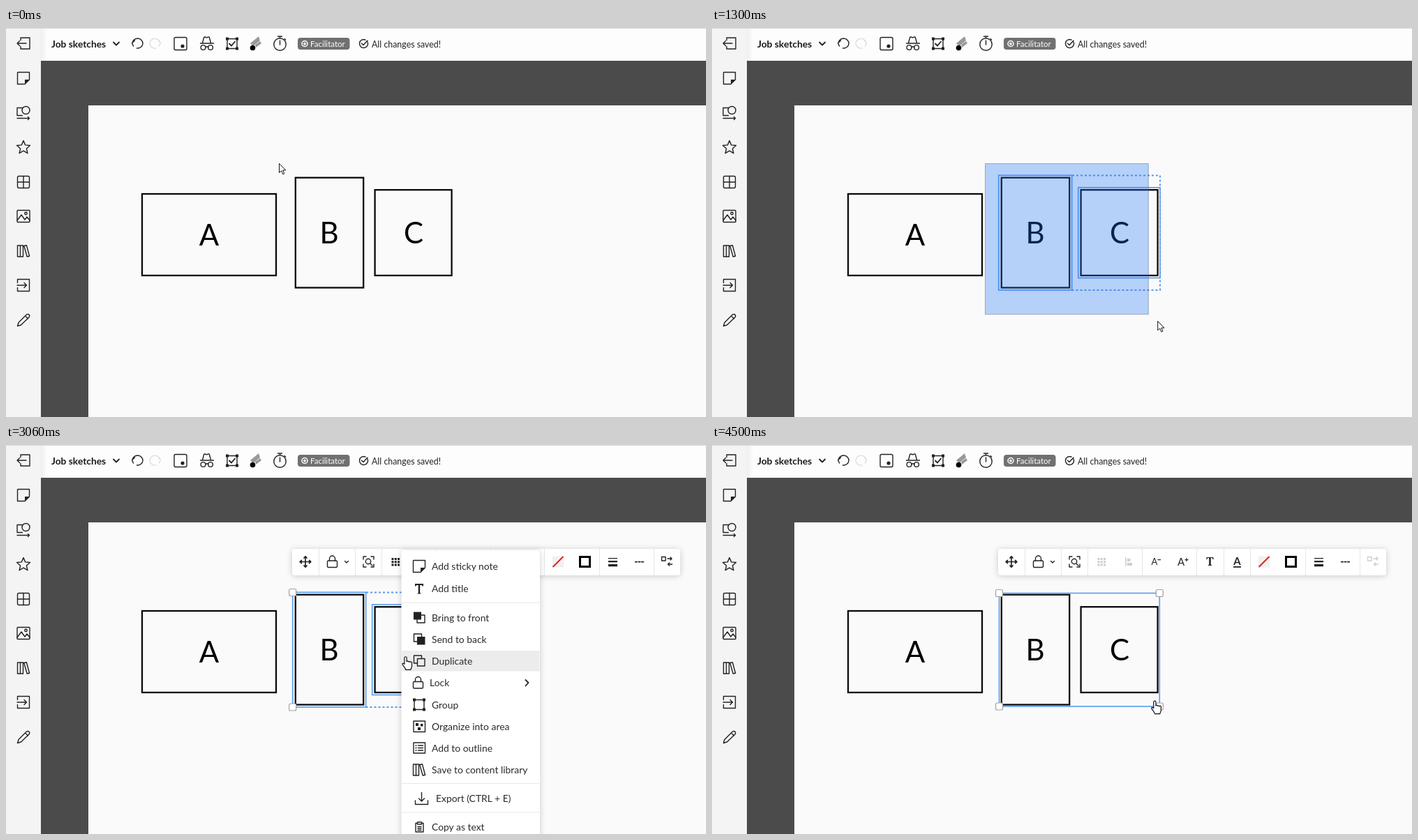
An HTML page for the animation above (5500 ms loop, 1003 by 558 pixels).

```html
<!DOCTYPE html>
<html lang="en">
<head>
<meta charset="utf-8">
<title>Grouping shapes</title>
<style>
html, body { margin: 0; width: 100%; height: 100%; overflow: hidden; background: #fafafa; }
svg { display: block; width: 1003px; height: 558px; font-family: Lato, "Open Sans", sans-serif; }
.i { fill: none; stroke: #222; stroke-width: 1.4; stroke-linejoin: round; stroke-linecap: round; }
.k { fill: #222; stroke: none; }
.box { fill: none; stroke: #0a0a0a; stroke-width: 2.3; }
.big { font-size: 42px; text-anchor: middle; }
.sel { fill: none; stroke: #589cef; stroke-width: 1.6; }
.grip rect { fill: #fff; stroke: #a0a0a0; stroke-width: 1.2; }
.panel { fill: #fff; filter: drop-shadow(0 1px 4px rgba(0,0,0,.2)); }
.rule { stroke: #e6e6e6; }
#menu text { font-size: 13.9px; fill: #2b2b2b; }
</style>
</head>
<body>
<svg viewBox="0 0 1003 558">
  <defs>
    <linearGradient id="edge"><stop stop-color="#eee"/><stop offset="1" stop-color="#fdfdfd"/></linearGradient>
    <g id="note"><path d="M-8-8.500H8.500V2L2 8.500H-8.500V-8z"/><path class="k" d="M2 8.500V2H8.500z"/></g>
    <g id="books"><path d="M-8.500-8h4V8h-4zM-4.500-8h4V8h-4zM.8-7.500l3.600-.8L8.600 7.200l-3.400.8z"/></g>
    <g id="frame"><path d="M-7-7H7V7H-7z"/><path class="k" d="M-9-9h4v4h-4zM5-9h4v4H5zM-9 5h4v4h-4zM5 5h4v4H5z"/></g>
    <g id="lock"><rect x="-7" y="-1.500" width="14" height="9.500" rx="1.500"/><path d="M-4-1.500v-3a4 4 0 0 1 8 0v3"/></g>
  </defs>

  <path d="M50 47H1003V111H118V558H50z" fill="#4b4b4b"/>
  <path d="M118 111H1003V558H118z" fill="#fafafa"/>
  <path d="M0 0H1003V47H0z" fill="#fdfdfd"/>
  <path d="M50 0h9v47h-9z" fill="url(#edge)"/>
  <path d="M0 0H50V558H0z" fill="#f4f4f4"/>
  <path d="M0 .5H1003" stroke="#d8d8d8"/>

  <g class="i">
    <g transform="translate(25 22)"><path d="M-4-4.500V-8H9V8H-4V4.500M4 0H-9M-5.500-3.500L-9 0l3.500 3.500"/></g>
    <use href="#note" x="25" y="72"/>
    <g transform="translate(25 121)"><path d="M-1.500 4.500H-9V-6.500H-1.500M-9 8.500H8.500M6.500 6.500l2 2-2 2"/><circle cx="3.500" cy="-3" r="5.500"/></g>
    <path id="star" transform="translate(25 171)"/>
    <g transform="translate(25 221)"><rect x="-8.500" y="-8.500" width="17" height="17" rx="2"/><path d="M0-8.500V8.500M-8.500 0H8.500"/></g>
    <g transform="translate(25 270)"><rect x="-9" y="-8.500" width="18" height="17" rx="1"/><path d="M-9 6l6-8 5 7 3-4 4 5"/><circle cx="3.500" cy="-4" r="1.700"/></g>
    <use href="#books" x="25" y="320"/>
    <g transform="translate(25 369)"><path d="M-8.500-3.500V-8.500H8.500V8.500H-8.500V3.500M-9 0H4M1-3.500L4.500 0 1 3.500"/></g>
    <path transform="translate(25 419)" d="M-8.500 8.500l1.500-5L4.500-8q2-1.200 3.500.3T8-4L-3.500 7zM2.500-6l4 4"/>
  </g>

  <text x="65" y="28" font-size="13.800" font-weight="700" fill="#1a1a1a">Job sketches</text>
  <g class="i">
    <path d="M154 20.500l4 4 4-4" stroke-width="1.800"/>
    <path id="undo" d="M184.500 18l-4 3.500 2 4.500M181 22a7.500 7 0 1 1 6.500 7"/>
    <path d="M218.500 18l3 3.500-2 4.500M221 22a7.500 7 0 1 0-6 7" stroke="#ddd"/>
    <rect x="241" y="13.500" width="18" height="18" rx="2"/><circle class="k" cx="253" cy="26" r="2.600"/>
    <path d="M278.500 22H297.500M281.500 21.500l2-7.500q.3-1.500 2-1l2 .8 2-.8q1.700-.5 2 1l2 7.500M286 27.500q2-1.500 4 0"/>
    <circle cx="282.500" cy="28" r="3.400"/><circle cx="293" cy="28" r="3.400"/>
    <use href="#frame" x="324" y="22.500"/><path d="M320 22.500l3 3 5-6" stroke-width="1.800"/>
    <path d="M350 22L362 12l2 6-10 8zM357 24l7-5 2 3-8 6z" fill="#999" stroke="none"/>
    <circle class="k" cx="353.500" cy="28.500" r="3.800" style="fill:#000"/>
    <circle cx="392.500" cy="23.500" r="8.700"/><path d="M392.500 24V18M389.500 12H395.500M392.500 12v2.500M399 15.500l1.700 1.500"/>
  </g>
  <rect x="418" y="14" width="74.500" height="17" rx="4" fill="#707070"/>
  <circle cx="428" cy="22.500" r="4" fill="none" stroke="#fff" stroke-width="1.500"/>
  <path d="M428 20l.8 1.600 1.800.2-1.300 1.300.3 1.800-1.600-.9-1.600.9.300-1.800-1.300-1.300 1.800-.2z" fill="#fff"/>
  <text x="436" y="26.500" font-size="11.500" fill="#fff">Facilitator</text>
  <path class="i" d="M518 20a6 6 0 1 1-3-3M509.500 22l2.500 2.500 6-6.500"/>
  <text x="524" y="28" font-size="12.400" fill="#222">All changes saved!</text>

  <rect class="box" x="195" y="238" width="192" height="117"/>
  <rect class="box" x="414.800" y="214.700" width="97.400" height="157.800"/>
  <rect class="box" x="528.600" y="232.200" width="110" height="122.800"/>
  <text class="big" x="291" y="312">A</text>
  <text class="big" x="463" y="309">B</text>
  <text class="big" x="584" y="309">C</text>

  <rect id="selB" class="sel" x="410.700" y="211.300" width="105" height="164.700"/>
  <g id="selC" class="sel">
    <rect x="524.700" y="228.800" width="117.300" height="129.700"/>
    <path d="M516 211.500H642V376H516" stroke-dasharray="3 3" stroke-width="2"/>
  </g>
  <rect id="group" class="sel" x="411.500" y="212.500" width="229.800" height="162.500"/>
  <g id="gripsLoose" class="grip"></g>
  <g id="gripsGroup" class="grip"></g>
  <rect id="marquee" x="391.500" y="194.500" fill="rgba(26,115,245,.31)" stroke="rgba(90,110,140,.5)"/>

  <g id="bar">
    <rect class="panel" x="410" y="149" width="556" height="38" rx="4"/>
    <path id="dividers" class="rule"/>
    <g class="i">
      <path d="M421.500 167.500H436.500M429 160V175M427 162l2-2.300 2 2.300M427 173l2 2.300 2-2.300M423.500 165.500l-2.300 2 2.300 2M434.500 165.500l2.300 2-2.300 2" stroke-width="1.700"/>
      <use href="#lock" x="467.500" y="167.500"/>
      <path d="M485.500 166.500l2.500 2.500 2.500-2.500"/>
      <path d="M512 164v-4h4M523 160h4v4M512 171v4h4M523 175h4v-4"/><circle cx="519" cy="167" r="3.700"/><path d="M522 170l3 3"/>
    </g>
    <g class="k">
      <g class="multi"><path id="dots"/></g>
      <path class="multi" d="M592 161h1.600v13H592zM595 163h4.500v4H595zM595 169h7v4H595z"/>
      <text x="629.500" y="172" font-size="13">A</text><path d="M638.500 164h4.500v1.200h-4.500z"/>
      <text x="667" y="173" font-size="15">A</text><path d="M677.500 164h5v1.200h-5zM679.400 162.100h1.200v5h-1.200z"/>
      <text x="713.500" y="173" font-size="16" font-weight="700" text-anchor="middle" font-family="Noto Serif, Liberation Serif, serif">T</text>
      <text x="752.500" y="172" font-size="15" font-weight="700" text-anchor="middle">A</text><path d="M747 174h11v1.800h-11z"/>
    </g>
    <path d="M783 159.500h16v16h-16z" fill="#f1f1f1"/><path d="M783.500 175L798.500 160" stroke="#e02020" stroke-width="2"/>
    <rect x="822.500" y="160.500" width="14" height="14" fill="none" stroke="#000" stroke-width="3"/>
    <path class="k" d="M863 162h13v1.300h-13zM863 166h13v2.300h-13zM863 171h13v3.300h-13zM901 166.700h3.800v1.700H901zM905.600 166.700h3.800v1.700h-3.800zM910.200 166.700h3.800v1.700h-3.800z"/>
    <g class="i multi"><path d="M939.500 160.500h5.500v5.500h-5.500zM948 163h6M952 161l2 2-2 2M954.500 171h-6M950.500 169l-2 2 2 2"/></g>
  </g>

  <g id="menu">
    <path class="panel" d="M566.500 155q0-4 4-4H761q4 0 4 4V570H566.500z"/>
    <rect id="hover" x="567" width="197.500" height="29.500" fill="#ececec"/>
    <path class="rule" d="M567 226H764.500M567 485.500H764.500M567 527H764.500"/>
    <g class="i" stroke-width="1.200">
      <use href="#note" x="592" y="174"/>
      <path class="k" d="M586 199h12v3.500h-1.500l-.5-1.500h-2.800v11.500h1.300v1H589.500v-1h1.300V201H588l-.5 1.500H586z"/>
      <path class="k" d="M584 239.500h11v11h-11z"/><path d="M595 244h5v11h-11v-4.500"/>
      <path d="M589 282h-4.500v-11h11v4"/><path class="k" d="M589 275h11.500v11.500H589z"/>
      <path d="M589 313h-4.500v-11h11v4M589.500 306.500h10.500v10.500h-10.500z"/>
      <use href="#lock" x="590.500" y="341"/>
      <path d="M744.500 337l4 4-4 4.500" stroke-width="1.800"/>
      <use href="#frame" x="592" y="372.500"/>
      <path d="M584 396h16.500v15.500H584z"/><path class="k" d="M587 399h4v4h-4zM594 400h3.500v3.500H594zM590 405h4v4h-4z"/>
      <path d="M584 427h16.500v15H584zM587 431h1M590.500 431h7M587 434.500h1M590.500 434.500h7M587 438h1M590.500 438h7"/>
      <use href="#books" x="592" y="466"/>
      <path d="M586.500 510v5.500h18V510M595.500 498.500V511M591.500 507l4 4 4-4"/>
      <path d="M589 542.500h-2V555h11V542.500h-2M589.500 541h6v3h-6zM590 547.500h5M590 550h5M590 552.500h5"/>
    </g>
  </g>

  <path id="arrow" d="M.5.5V13.500l3-2.700 2.300 5 2-.9-2.200-4.900h4.200z" fill="#fff" stroke="#111"/>
  <path id="hand" d="M3.800 11V2.200a1.600 1.600 0 0 1 3.200 0V7.500a1.400 1.400 0 0 1 2.600.4 1.400 1.400 0 0 1 2.400.6 1.300 1.300 0 0 1 2.400 1V14c0 2-1.400 3.200-1.600 5.200H5.600C5.200 16.600 2.200 14 .9 11.600c-.7-1.400.8-2.300 1.700-1.200z" fill="#fff" stroke="#111" stroke-width="1.200" stroke-linejoin="round"/>
</svg>
<script>
const LOOP = 5500;
const $ = id => document.getElementById(id);
const set = (id, attrs) => { for (const k in attrs) $(id).setAttribute(k, attrs[k]); };
const add = (parent, tag, attrs, text = '') => {
  const el = document.createElementNS('http://www.w3.org/2000/svg', tag);
  for (const k in attrs) el.setAttribute(k, attrs[k]);
  el.textContent = text;
  parent.append(el);
};

// Static repeats
const spikes = Array.from({ length: 10 }, (_, i) => {
  const a = i * Math.PI / 5, r = i % 2 ? 4.6 : 10;
  return `${(r * Math.sin(a)).toFixed(1)} ${(.6 - r * Math.cos(a)).toFixed(1)}`;
});
set('star', { d: `M${spikes.join('L')}z` });
set('dividers', { d: [448.5, 500.5, 538.5, 616.5, 694.5, 733.5, 771.5, 850.5, 928.5].map(x => `M${x} 149V187`).join('') });
set('dots', { d: Array.from({ length: 9 }, (_, i) => `M${552.5 + i % 3 * 4.3} ${162 + (i / 3 | 0) * 4.3}h3v3h-3z`).join('') });

const grips = (id, x0, y0, x1, y1) => {
  for (const x of [x0, x1]) for (const y of [y0, y1])
    add($(id), 'rect', { x: x - 5, y: y - 5, width: 10, height: 10, rx: 2 });
};
grips('gripsLoose', 410.7, 211.5, 642, 376);
grips('gripsGroup', 411.5, 212.5, 641.3, 375);

[['Add sticky note', 174], ['Add title', 206], ['Bring to front', 247.5], ['Send to back', 278.5],
 ['Duplicate', 310], ['Lock', 341, 607], ['Group', 372.5], ['Organize into area', 403.5],
 ['Add to outline', 435], ['Save to content library', 466], ['Export (CTRL + E)', 507, 616],
 ['Copy as text', 548]].forEach(([label, y, x = 610]) => add($('menu'), 'text', { x, y: y + 5 }, label));

// Pointer paths: [ms, x, y], at rest at both ends of each path
const paths = [
  [[430, 391, 194], [830, 504, 305], [960, 555, 357], [1300, 638, 420], [1530, 668, 439]],
  [[1830, 668, 439], [2230, 567, 299.5]],
  [[3030, 567, 299.5], [3060, 572, 303], [3530, 634, 366.5]]
];

function pointer(t) {
  const p = paths.filter(q => q[0][0] <= t).pop() || paths[0];
  const last = p.length - 1;
  if (t <= p[0][0]) return p[0].slice(1);
  if (t >= p[last][0]) return p[last].slice(1);
  const i = p.findIndex(q => q[0] > t) - 1;
  const h = p[i + 1][0] - p[i][0], u = (t - p[i][0]) / h;
  const slope = (j, k) => j === 0 || j === last ? 0 : (p[j + 1][k] - p[j - 1][k]) / (p[j + 1][0] - p[j - 1][0]);
  return [1, 2].map(k => {
    const a = p[i][k], b = p[i + 1][k];
    return a + (b - a) * u * u * (3 - 2 * u)
      + h * u * (1 - u) * (slope(i, k) * (1 - u) - slope(i + 1, k) * u);
  });
}

const ramp = (t, a, b) => Math.min(1, Math.max(0, (t - a) / (b - a)));
const show = (id, on) => { $(id).style.display = on ? '' : 'none'; };
const multi = document.querySelectorAll('.multi');

function draw(t) {
  const [x, y] = pointer(t);
  const hand = t >= 1830 && y < 376;
  show('arrow', !hand);
  show('hand', hand);
  set('arrow', { transform: `translate(${x} ${y})` });
  set('hand', { transform: `translate(${x - 5} ${y})` });

  // The marquee trails the pointer a little
  const [mx, my] = pointer(t - 60);
  const w = mx - 391, h = my - 194;
  show('marquee', t < 1560 && w > 0);
  set('marquee', { width: Math.max(0, w - 1), height: Math.max(0, h - 1) });

  const grouped = t >= 4160;
  show('selB', !grouped && w > 23 && h > 20);
  show('selC', !grouped && t >= 1000);
  show('gripsLoose', !grouped && t >= 1560);
  show('group', grouped);
  show('gripsGroup', grouped);

  $('bar').style.opacity = ramp(t, 1530, 1600);
  multi.forEach(el => { el.style.opacity = t >= 4060 ? .22 : 1; });

  $('menu').style.opacity = ramp(t, 2500, 2700) * (1 - ramp(t, 4090, 4270));
  show('menu', t > 2500 && t < 4270);
  show('hover', t >= 3060);
  set('hover', { y: y < 326 ? 295 : y < 357 ? 326.5 : 357.7 });
}

function tick() {
  draw(performance.now() % LOOP);
  requestAnimationFrame(tick);
}
tick();
</script>
</body>
</html>
```
